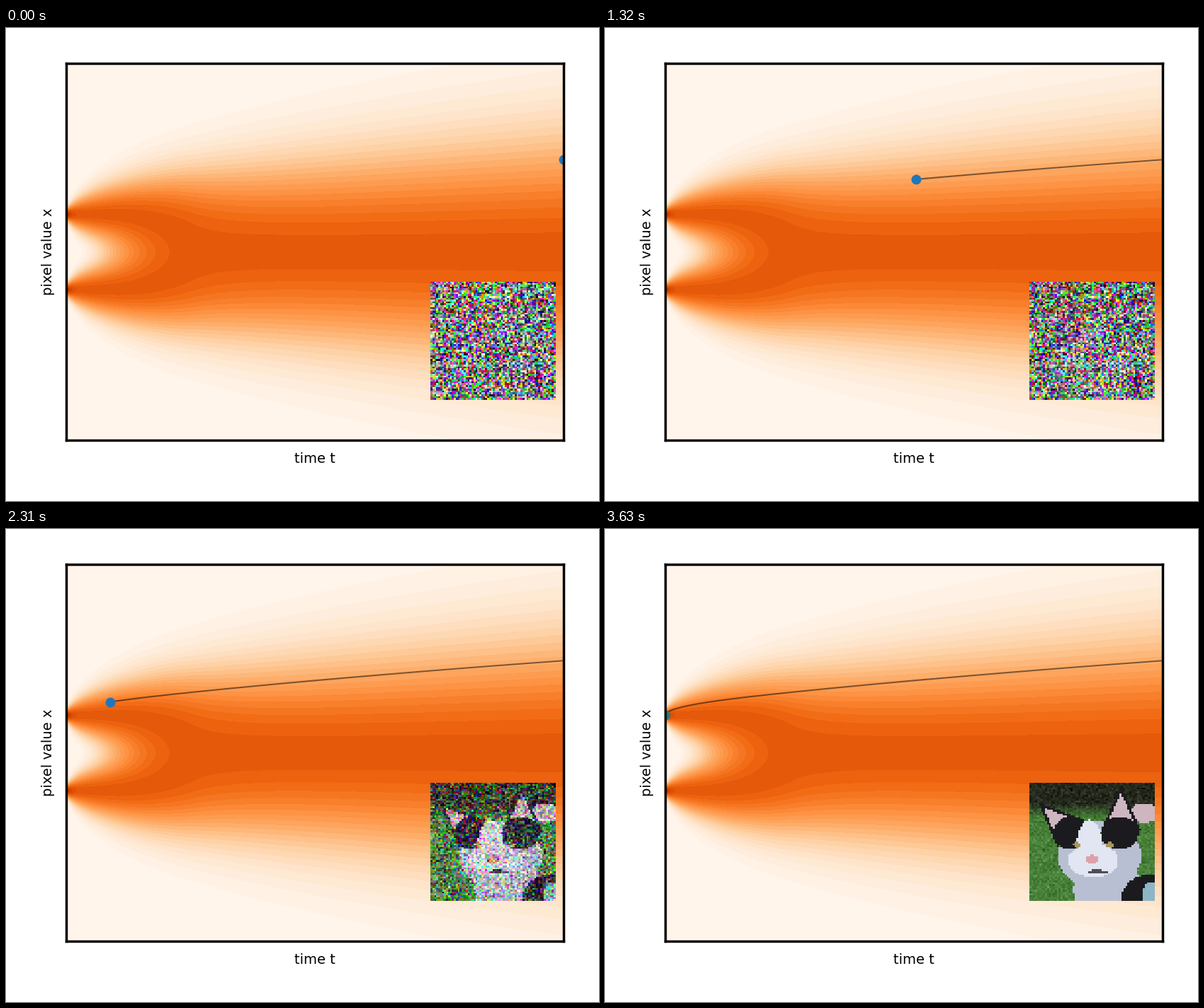
Recreate the animation shown at these times as a matplotlib script. Size 837 px wide and 669 px high, loop 3960 ms.

```python
import math

import numpy as np
import matplotlib.pyplot as plt
from matplotlib.animation import FuncAnimation

W, H, DPI = 837, 669, 100
FRAMES, STEP_MS = 12, 330
LEFT, RIGHT, TOP, BOTTOM = 85, 787, 50, 583.5
SIGMA_MAX, SIGMA_MIN = 2.0, 0.015
BAND, BANDS = 0.0488, 30
START_X = 2.446
BLUE = np.array([31, 119, 186]) / 255
TEAL = np.array([44, 123, 112]) / 255
THUMB = (599, 359, 176, 167)
CELLS = 64

fig = plt.figure(figsize=((W + 1e-6) / DPI, (H + 1e-6) / DPI), dpi=DPI,
                 facecolor="white")


def place(x, y, w, h):
    return fig.add_axes([x / W, 1 - (y + h) / H, w / W, h / H])


def density():
    """Two points at -1 and +1 blurred with variance 4t, peak scaled to 1."""
    root = np.linspace(SIGMA_MIN / SIGMA_MAX, 1, 300)
    x = np.linspace(-5, 5, 1001)
    sigma = SIGMA_MAX * root
    p = sum(np.exp(-((x[:, None] - m) / sigma) ** 2 / 2) for m in (-1, 1))
    p /= p.max(axis=0)
    t = root ** 2
    p *= 1 + 0.3 * np.exp(-t / 0.008)
    t[0] = 0
    return t, x, p


def cdf(x, sigma):
    return sum(0.25 * (1 + math.erf((x - m) / (sigma * math.sqrt(2))))
               for m in (-1, 1))


QUANTILE = cdf(START_X, SIGMA_MAX)


def flow(sigma):
    """Follow the probability flow: the quantile stays constant."""
    lo, hi = 0.0, 5.0
    for _ in range(40):
        mid = (lo + hi) / 2
        if cdf(mid, sigma) < QUANTILE:
            lo = mid
        else:
            hi = mid
    return (lo + hi) / 2


def ease_at(i):
    return (1 + math.cos(math.pi * i / (FRAMES - 1))) / 2


def cat_picture(rng):
    grid = (np.arange(CELLS) + 0.5) / CELLS
    gx, gy = np.meshgrid(grid, grid)
    black, white, grey = (27, 27, 31), (226, 230, 242), (184, 191, 210)
    pink, gold, steel = (205, 182, 192), (168, 150, 96), (140, 182, 198)

    # dark hedge fading into grass
    mix = np.clip((gy - 0.18) / 0.12, 0, 1)[..., None]
    img = (1 - mix) * np.array([38, 42, 30]) + mix * np.array([72, 128, 58])
    img += rng.normal(0, 11, (CELLS, CELLS, 1))

    def oval(color, cx, cy, rx, ry):
        img[((gx - cx) / rx) ** 2 + ((gy - cy) / ry) ** 2 < 1] = color

    def ear(color, x, y, angle, length):
        c, s = math.cos(angle), math.sin(angle)
        along = (gx - x) * c + (gy - y) * s
        across = (gy - y) * c - (gx - x) * s
        img[(along > 0) & (along < length)
            & (abs(across) < 0.42 * along)] = color

    oval(pink, 0.92, 0.26, 0.12, 0.08)
    oval(grey, 0.62, 0.9, 0.27, 0.3)
    oval(grey, 0.56, 0.62, 0.33, 0.29)
    for x, y, angle in ((0.07, 0.17, math.pi / 4), (0.73, 0.03, math.pi / 2)):
        ear(black, x, y, angle, 0.38)
        c, s = math.cos(angle), math.sin(angle)
        ear(pink, x + 0.06 * c, y + 0.06 * s, angle, 0.27)
    for x in (0.34, 0.72):
        oval(black, x, 0.43, 0.15, 0.14)
    oval(white, 0.48, 0.52, 0.1, 0.2)
    oval(white, 0.51, 0.66, 0.2, 0.14)
    for x in (0.38, 0.64):
        oval(gold, x, 0.53, 0.03, 0.025)
    oval((222, 160, 168), 0.5, 0.65, 0.045, 0.035)
    oval((80, 76, 86), 0.54, 0.755, 0.08, 0.014)
    oval(black, 0.95, 1, 0.22, 0.22)
    oval(steel, 0.98, 0.94, 0.08, 0.1)
    return img / 127.5 - 1


rng = np.random.default_rng(7)
cat = cat_picture(rng)
noise = rng.normal(size=cat.shape)


def noisy(ease):
    angle = ease * math.pi / 2
    picture = math.cos(angle) ** 2 * cat + math.sin(angle) * noise
    return np.clip((picture + 1) / 2, 0, 1)


ax = place(LEFT, TOP, RIGHT - LEFT, BOTTOM - TOP)
ax.contourf(*density(), levels=BAND * np.arange(BANDS + 1), cmap="Oranges",
            vmin=BAND / 2, vmax=BAND * (BANDS - 0.25))
ax.set(xlim=(0, 1), ylim=(-5, 5), xticks=[], yticks=[])
ax.set_facecolor(plt.get_cmap("Oranges")(0.0))
for spine in ax.spines.values():
    spine.set_linewidth(2.5)

font = dict(family="DejaVu Sans", fontsize=14, ha="center", va="baseline")
fig.text(436 / W, 1 - 614.7 / H, "time t", **font)
fig.text(65 / W, 1 - 316.75 / H, "pixel value x", rotation=90,
         rotation_mode="anchor", **font)

trail, = ax.plot([], [], color="black", alpha=0.5, lw=1.5)
dot, = ax.plot([], [], "o", ms=10, mew=0)

thumb_ax = place(*THUMB)
thumb_ax.axis("off")
thumb = thumb_ax.imshow(noisy(1), interpolation="nearest", aspect="auto")

path_sigma = np.linspace(SIGMA_MAX, SIGMA_MIN, 160)
path_x = np.array([flow(s) for s in path_sigma])


def draw(i):
    ease = ease_at(i)
    sigma = SIGMA_MIN + (SIGMA_MAX - SIGMA_MIN) * ease
    t, x = (sigma / SIGMA_MAX) ** 2, flow(sigma)
    done = path_sigma > sigma
    trail.set_data(np.append((path_sigma[done] / SIGMA_MAX) ** 2, t),
                   np.append(path_x[done], x))
    dot.set_data([t], [x])
    fade = max(0, 1 - sigma / 0.5)
    dot.set_color((1 - fade) * BLUE + fade * TEAL)
    thumb.set_data(noisy(ease))
    return trail, dot, thumb


anim = FuncAnimation(fig, draw, frames=FRAMES, interval=STEP_MS, repeat=True,
                     repeat_delay=0, init_func=lambda: draw(0))
plt.show()
```
